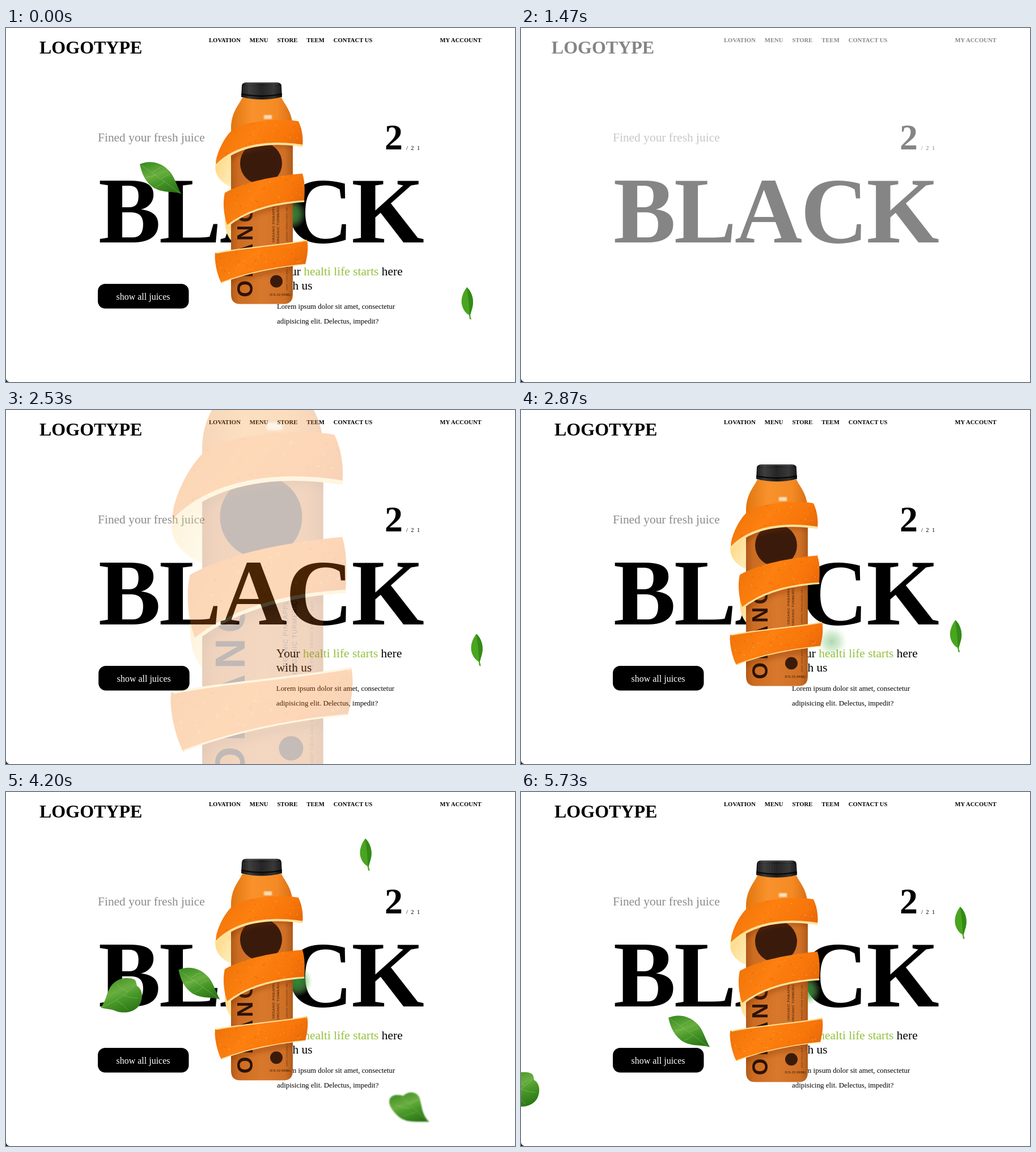
Write an HTML page that moves like this. It is 898 by 624 pixels and loops after 5.79 s.

```html
<!DOCTYPE html>
<html lang="en">
<head>
<meta charset="utf-8">
<title>Juice landing page</title>
<style>
  html, body { margin: 0; width: 100%; height: 100%; overflow: hidden; background: #fff; }
  svg { display: block; width: 898px; height: 624px; }
  text { font-family: "Liberation Serif", "Times New Roman", serif; white-space: pre; }
  .bold { font-weight: 700; }
  .nav { font-size: 10.67px; font-weight: 700; }
  .lead { font-size: 21.45px; }
  .copy { font-size: 12.9px; }
  .label text { font-family: "Liberation Sans", Arial, sans-serif; fill: #2b1307; }
  .vein { fill: none; stroke: #b4d892; stroke-width: .8px; opacity: .45; }
</style>
</head>
<body>
<svg viewBox="0 0 898 624">
  <defs>
    <linearGradient id="body">
      <stop offset="0" stop-color="#b45a18"/>
      <stop offset=".12" stop-color="#cc6c22"/>
      <stop offset=".5" stop-color="#d8782c"/>
      <stop offset=".87" stop-color="#d07026"/>
      <stop offset="1" stop-color="#b05a1a"/>
    </linearGradient>
    <linearGradient id="neck">
      <stop offset="0" stop-color="#e2760f"/>
      <stop offset=".35" stop-color="#f9922c"/>
      <stop offset=".75" stop-color="#f48a24"/>
      <stop offset="1" stop-color="#d96f14"/>
    </linearGradient>
    <linearGradient id="cap">
      <stop offset="0" stop-color="#111"/>
      <stop offset=".2" stop-color="#3a3a3a"/>
      <stop offset=".5" stop-color="#1b1b1b"/>
      <stop offset=".8" stop-color="#333"/>
      <stop offset="1" stop-color="#0b0b0b"/>
    </linearGradient>
    <linearGradient id="peel" x1="0" y1=".2" x2="1" y2=".6">
      <stop offset="0" stop-color="#ee7308"/>
      <stop offset=".4" stop-color="#fd8010"/>
      <stop offset=".75" stop-color="#f8760a"/>
      <stop offset="1" stop-color="#e4660a"/>
    </linearGradient>
    <linearGradient id="pith" x1="0" y1="0" x2="1" y2="1">
      <stop offset="0" stop-color="#ffd27a"/>
      <stop offset="1" stop-color="#fdf0bd"/>
    </linearGradient>
    <linearGradient id="green" x1=".2" y1="0" x2=".7" y2="1">
      <stop offset="0" stop-color="#3c8f22"/>
      <stop offset=".4" stop-color="#6aae40"/>
      <stop offset=".6" stop-color="#4a9a2a"/>
      <stop offset="1" stop-color="#2b7516"/>
    </linearGradient>
    <radialGradient id="glow">
      <stop offset="0" stop-color="#2f9a3a" stop-opacity=".9"/>
      <stop offset=".5" stop-color="#58b34f" stop-opacity=".6"/>
      <stop offset="1" stop-color="#8fd07c" stop-opacity="0"/>
    </radialGradient>
    <filter id="soft"><feGaussianBlur stdDeviation="1"/></filter>
    <filter id="shade" x="-20%" y="-50%" width="140%" height="200%"><feGaussianBlur stdDeviation="4"/></filter>
    <clipPath id="inBottle"><path d="M397 172H506V470Q506 487 490 487H413Q397 487 397 470Z"/></clipPath>
    <clipPath id="inPeel">
      <path id="band1" d="M403 177C436 162 490 160 516 165C522 177 525 195 523 208C480 197 406 205 371 243C367 234 381 194 403 177Z"/>
      <path id="band2" d="M386 291C420 272 470 262 523 257C528 272 527 292 526 306C480 307 425 321 391 349C384 332 382 308 386 291Z"/>
      <path id="band3" d="M369 397C415 387 480 384 531 374C534 386 532 402 528 417C480 421 425 432 380 450C373 437 367 412 369 397Z"/>
    </clipPath>
  </defs>

  <g id="page">
    <g id="head">
      <text id="logo" class="bold" x="59" y="45" font-size="32">LOGOTYPE</text>
      <text id="menu" class="nav" x="358" y="25"></text>
      <text class="nav" x="765.5" y="25">MY ACCOUNT</text>
      <text class="lead" x="162" y="200" fill="#8c8c8c">Fined your fresh juice</text>
      <text class="bold" x="668" y="214" font-size="64">2</text>
      <text x="706" y="214.5" font-size="10.67" letter-spacing="5.33">/21</text>
      <text class="bold" x="163" y="378" font-size="165" letter-spacing="-3">BLACK</text>
    </g>
    <g id="button">
      <rect x="162" y="451" width="160.5" height="43.5" rx="13"/>
      <text x="242" y="479" font-size="16" fill="#fff" text-anchor="middle">show all juices</text>
    </g>
    <g id="story">
      <text class="lead" x="478" y="435.5">Your <tspan fill="#93c03d">healti life starts</tspan> here</text>
      <text class="lead" x="478" y="461">with us</text>
      <text class="copy" x="478" y="495">Lorem ipsum dolor sit amet, consectetur</text>
      <text class="copy" x="478" y="521">adipisicing elit. Delectus, impedit?</text>
    </g>
    <circle id="haze" r="27" fill="url(#glow)"/>

    <g id="bottle">
      <path fill="url(#pith)" d="M371 238C364 258 381 275 398 281V214Z"/>
      <path fill="url(#pith)" d="M386 335C386 356 390 368 399 377V330Z"/>
      <path fill="url(#neck)" d="M417 123H486C491 135 506 148 506 178V215H397V178C397 148 412 135 417 123Z"/>
      <path fill="url(#body)" d="M397 198H506V470Q506 487 490 487H413Q397 487 397 470Z"/>
      <path d="M455 154h14v7h-14z" fill="#fff3df" opacity=".8" filter="url(#soft)"/>
      <g class="label">
        <circle cx="450" cy="239" r="37" fill="#3a1b0b"/>
        <circle cx="477" cy="447" r="11" fill="#3a1b0b"/>
        <text transform="translate(435 475) rotate(-90)" font-size="38" font-weight="700" letter-spacing="5">ORANGE</text>
        <text transform="translate(474 396) rotate(-90)" font-size="5.6" letter-spacing=".6">ROT, ORGANIC PINEAPPLE,</text>
        <text transform="translate(482 396) rotate(-90)" font-size="5.6" letter-spacing=".6">ICE, ORGANIC TURMERIC</text>
        <text transform="translate(497 462) rotate(-90)" font-size="3.6" letter-spacing=".6" opacity=".7">KEEP COLD AND SHAKE WELL / BEST SERVED FRESH EVERY DAY</text>
        <text x="465" y="472" font-size="4.6">15 FL OZ (450ML)</text>
      </g>
      <g clip-path="url(#inBottle)" fill="none" stroke="#7d3205" stroke-width="7" opacity=".45" filter="url(#shade)">
        <path d="M385 236C425 205 480 201 523 210M391 354C425 325 480 311 526 309M380 453C425 436 480 425 528 421"/>
      </g>
      <g fill="url(#peel)">
        <use href="#band1"/><use href="#band2"/><use href="#band3"/>
      </g>
      <g id="pores" clip-path="url(#inPeel)"></g>
      <g fill="none" stroke="#ffe19a" stroke-linecap="round">
        <path stroke-width="4" d="M371 243C406 206 466 199 522 208"/>
        <path stroke-width="3.2" d="M391 349C425 322 474 309 525 306"/>
        <path stroke-width="2" d="M372 397C415 388 480 384 530 375"/>
        <path stroke-width="1.6" d="M381 449C425 432 480 421 527 417"/>
      </g>
      <path fill="url(#cap)" d="M416 103Q416 96.5 424 96.5H478Q486 96.5 486 103L487 122Q451 131 415 122Z"/>
      <path id="ribs" stroke="#555" stroke-width=".8" opacity=".7"/>
      <path d="M415 117Q451 124 487 117" fill="none" stroke="#060606" stroke-width="2"/>
      <path d="M422 99Q451 97 480 99" fill="none" stroke="#5a5a5a"/>
    </g>

    <g id="heartRight" filter="url(#soft)">
      <path fill="url(#green)" d="M-34 -14C-30 -24 -15 -22 -10 -20C2 -31 18 -26 20 -12C24 4 24 14 36 26C14 24 -4 30 -20 15C-29 6 -37 -4 -34 -14Z"/>
      <path class="vein" d="M-12 -18Q8 2 34 25M0 -6Q10 -8 16 -14M2 2Q-10 2 -24 -4M12 9Q0 12 -10 16"/>
    </g>
    <g id="heartLeft">
      <path fill="url(#green)" d="M-36 22C-23 8 -27 -12 -9 -24C2 -32 17 -30 22 -28C27 -26 27 -20 28 -16C38 -10 39 4 34 15C27 31 4 34 -10 28C-20 24 -28 25 -36 22Z"/>
      <path class="vein" d="M26 -18Q0 8 -34 22M12 -6Q0 -10 -8 -20M4 0Q18 6 30 6M-8 10Q4 16 12 26"/>
    </g>
    <g id="wide">
      <path fill="url(#green)" d="M-36 -24C-22 -30 -2 -30 14 -14C25 -4 28 12 37 28C22 23 0 28 -16 14C-28 4 -33 -10 -36 -24Z"/>
      <path class="vein" d="M-35 -23Q0 0 36 28M-14 -10Q-4 -16 4 -20M2 1Q10 -4 18 -6M-8 -6Q-16 0 -24 -2M8 6Q0 14 -8 16"/>
    </g>
    <g id="slim">
      <path fill="#49a51f" d="M-1 -28C8 -20 12 -6 9 7L5 21L7 29L4 28L3 21C-6 16 -12 4 -10 -8C-8 -18 -4 -24 -1 -28Z"/>
      <path fill="#338a17" d="M-1 -28C8 -20 12 -6 9 7L5 21L4 24Q3 -2 -1 -28Z"/>
    </g>
  </g>

  <path id="cursor" fill="#fff" stroke="#111" stroke-linejoin="round" d="M0 0V14L3.3 11L5.6 16L7.8 15L5.6 10.3H10Z"/>
  <path fill="#222" d="M0 618Q1 623 6 624H0Z"/>
</svg>
<script>
const LOOP = 5790, STEP = 66.5, RELOAD = 990;
const $ = id => document.getElementById(id);
const add = (parent, tag, attrs) => {
  const node = document.createElementNS('http://www.w3.org/2000/svg', tag);
  for (const k in attrs) node.setAttribute(k, attrs[k]);
  return parent.appendChild(node);
};

['LOVATION', 'MENU', 'STORE', 'TEEM', 'CONTACT US'].forEach((name, i) => {
  add($('menu'), 'tspan', { dx: i ? 16 : 0 }).textContent = name;
});

let ribs = '';
for (let x = 419; x < 486; x += 3) ribs += `M${x} 102V${115 + 4 * Math.sin((x - 415) / 72 * Math.PI)}`;
$('ribs').setAttribute('d', ribs);

let seed = 7;
const rnd = () => (seed = seed * 16807 % 2147483647) / 2147483647;
for (let i = 0; i < 420; i++) {
  add($('pores'), 'circle', {
    cx: 368 + rnd() * 166, cy: 163 + rnd() * 290, r: .5 + rnd() * .9,
    fill: i % 3 ? '#d65a02' : '#ffb04e', opacity: .45
  });
}

// Key points of each flight: time, x, y
const flights = {
  slim: [[1900, 940, 480], [2870, 766, 398], [3530, 602, 390], [3950, 610, 80], [4870, 714, 315], [5730, 776, 230]],
  wide: [[3100, 60, 250], [3530, 294, 301], [4870, 335, 370], [5730, 296, 422]],
  heartLeft: [[3100, 40, 300], [3530, 261, 335], [4870, 93, 392], [5730, -5, 524]],
  heartRight: [[3200, 960, 400], [3530, 762, 433], [3950, 640, 550], [4700, 940, 530]],
  haze: [[2600, 560, 440], [3530, 523, 342], [5730, 502, 350]]
};
// Where leaves lie before the reload
const rest = { slim: [814, 485], wide: [272, 264], haze: [503, 328] };

const progress = (t, from, to) => Math.max(0, Math.min(1, (t - from) / (to - from)));

// Smooth curve through the key points, with slopes taken from the neighbours.
function follow(keys, t) {
  const last = keys.length - 1;
  if (t >= keys[last][0]) return keys[last].slice(1);
  const i = keys.findIndex(k => k[0] > t) - 1;
  const a = keys[i], b = keys[i + 1], d = b[0] - a[0], u = (t - a[0]) / d;
  const slope = (j, k) => {
    const p = keys[Math.max(0, j - 1)], n = keys[Math.min(last, j + 1)];
    return (n[k] - p[k]) / (n[0] - p[0]) * d;
  };
  return [1, 2].map(k => {
    const c = b[k] - a[k], m = slope(i, k), n = slope(i + 1, k);
    return a[k] + u * (m + u * (3 * c - 2 * m - n + u * (m + n - 2 * c)));
  });
}

function place(node, x, y, opacity) {
  node.setAttribute('transform', `translate(${x} ${y})`);
  node.setAttribute('opacity', opacity);
}

function drawLeaf(id, t, early) {
  const keys = flights[id];
  if (early && rest[id]) place($(id), ...rest[id], 1);
  else if (early || t < keys[0][0]) place($(id), 0, 0, 0);
  else place($(id), ...follow(keys, t), progress(t, keys[0][0], keys[0][0] + 600));
}

function drawBottle(t, early) {
  const since = Math.max(0, t - (early ? 30 : 2930));
  const bob = 16.5 * (1 - Math.cos(since / 2100 * Math.PI));
  const enter = early ? 1 : progress(t, 2420, 2800);
  const scale = 1 + 2.7 * (1 - enter) ** 3;
  $('bottle').setAttribute('opacity', enter);
  $('bottle').setAttribute('transform', `translate(450 ${290.5 + bob}) scale(${scale}) translate(-450 -291)`);
}

// The pointer dips in from the top edge, then later crosses the text.
function drawCursor(t) {
  const a = t - 2130, b = t - 3530;
  if (Math.abs(a) < 300) place($('cursor'), 314.5 + a * .8, 18 - (a / 50) ** 2, 1);
  else place($('cursor'), 641.5 - b * .4, 410 + b * .5, Math.abs(b) < 300 ? 1 : 0);
}

function draw(t) {
  const early = t < RELOAD;
  $('page').setAttribute('visibility', early || t >= 1260 ? 'visible' : 'hidden');

  const show = early ? 1 : progress(t, 1200, 1750);
  place($('head'), 0, 0, show);
  place($('logo'), 10 * (show - 1), 0, 1);

  const left = early ? 0 : (1 - progress(t, 1650, 2610)) ** 2;
  place($('button'), 176 * left, 0, 1 - left);
  place($('story'), -176 * left, 0, 1 - left);

  drawBottle(t, early);
  for (const id in flights) drawLeaf(id, t, early);
  drawCursor(t);
}

function tick() {
  const step = Math.min(86, Math.floor(performance.now() % LOOP / STEP));
  draw(step * 66.6);
  requestAnimationFrame(tick);
}
tick();
</script>
</body>
</html>
```
